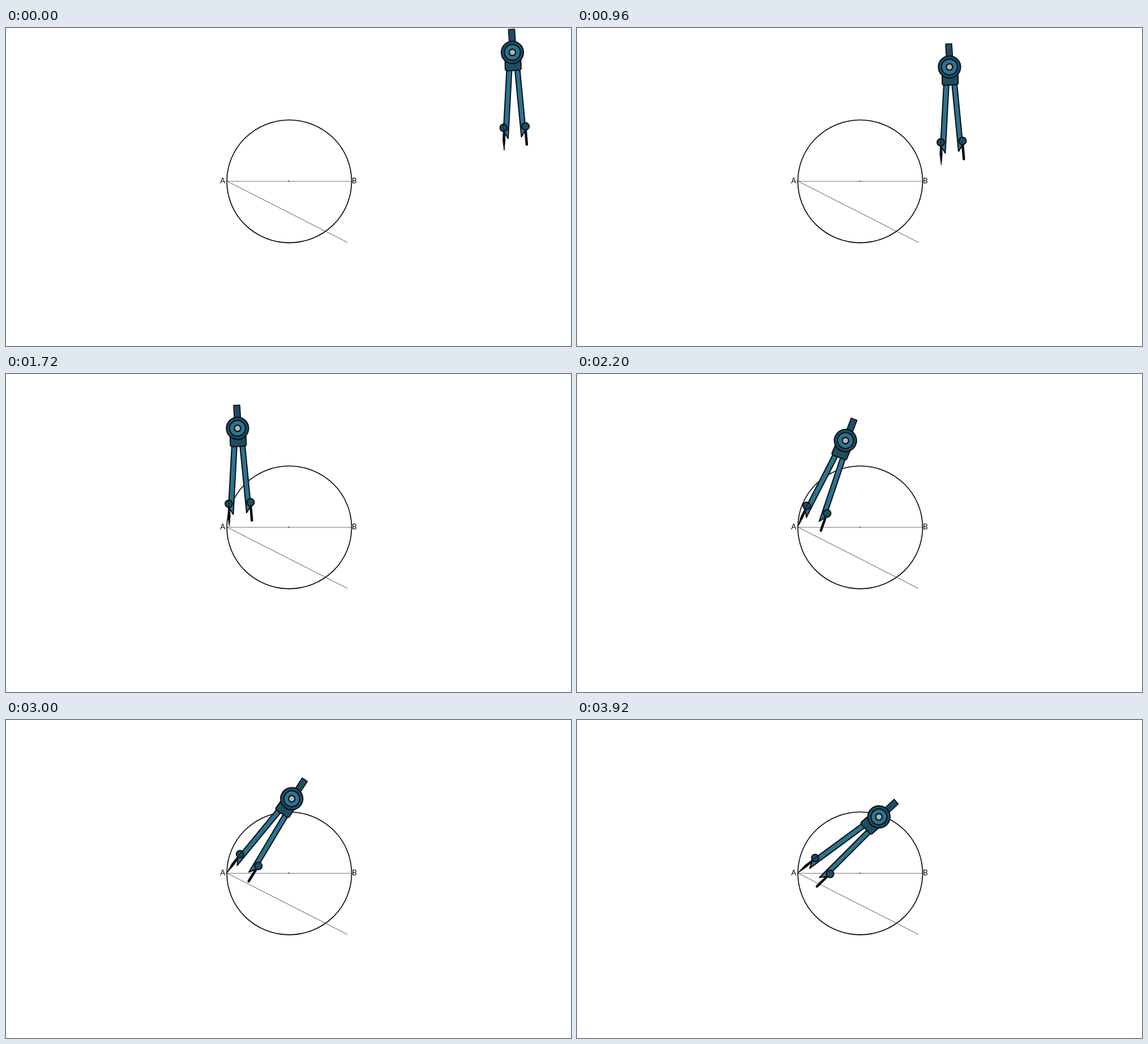
These frames come from a looping animation (998x561 px, 3.96 s). An HTML page with a canvas:

```html
<!DOCTYPE html>
<html lang="en">
<head>
<meta charset="utf-8">
<title>Compass construction</title>
<style>
html, body { margin: 0; width: 100%; height: 100%; overflow: hidden; background: #fff; }
canvas { display: block; }
</style>
</head>
<body>
<canvas id="stage" width="998" height="561"></canvas>
<script>
const ctx = document.getElementById('stage').getContext('2d');
const LOOP = 3960, STEP = 40;
const DARK = '#1e4c62', BLUE = '#2a7392', INK = '#0a0d0f';
const NEEDLE = { x: -14.5, y: 173.5 };   // needle point, relative to the hub
const START = { x: 880, y: 216.5 };      // needle point when the loop begins
const A = { x: 390, y: 269.8 };
const RAD = Math.PI / 180;
const clamp = v => Math.min(1, Math.max(0, v));

function finish(fill, stroke, width) {
  if (fill) { ctx.fillStyle = fill; ctx.fill(); }
  if (stroke) { ctx.strokeStyle = stroke; ctx.lineWidth = width; ctx.stroke(); }
}

function poly(points, fill, width = 2) {
  ctx.beginPath();
  points.forEach(([x, y]) => ctx.lineTo(x, y));
  ctx.closePath();
  finish(fill, INK, width);
}

function disc(x, y, r, fill, width = 2) {
  ctx.beginPath();
  ctx.arc(x, y, r, 0, 7);
  finish(fill, INK, width);
}

function line(x1, y1, x2, y2, color, width) {
  ctx.beginPath();
  ctx.moveTo(x1, y1);
  ctx.lineTo(x2, y2);
  finish(null, color, width);
}

function drawFigure() {
  ctx.lineCap = 'butt';
  line(390, 270.4, 610, 270.4, '#555', 0.8);
  line(390, 270, 603.5, 378.5, '#333', 0.8);
  ctx.beginPath();
  ctx.ellipse(500.3, 270.6, 110.2, 108.3, 0, 0, 7);
  finish(null, '#000', 1.6);
  ctx.beginPath();
  ctx.arc(499.5, 270.2, 0.9, 0, 7);
  finish('#000');
  ctx.fillStyle = '#000';
  ctx.font = '13.3px Lato, sans-serif';
  ctx.fillText('A', 378.3, 273.8);
  ctx.fillText('B', 610.9, 273.8);
}

function drawCompass(x, y, angle) {
  ctx.save();
  ctx.translate(x, y);
  ctx.rotate(angle);
  ctx.translate(-NEEDLE.x, -NEEDLE.y);
  ctx.lineJoin = 'round';

  poly([[-16.2, 139], [-17, 155], [-14.5, 173], [-12.8, 155], [-13.5, 139]], INK, 1);
  ctx.lineCap = 'round';
  line(23.3, 138, 25.4, 162.5, INK, 4.5);

  poly([[-10, 30], [-1, 30], [-7.5, 152], [-15.8, 139]], BLUE);
  poly([[4.3, 30], [13, 29], [23.5, 137], [16, 149]], BLUE);
  disc(-15.5, 133, 6.4, DARK);
  line(-15.3, 127.5, -15.7, 138.5, INK, 1);
  disc(23, 130.5, 6.6, DARK);

  poly([[-13, 13], [-12.7, 30], [-10.8, 32.4], [13.5, 31.2], [15.4, 29], [14.8, 12]], DARK);
  poly([[-7, -40.4], [4, -41], [5.5, -18], [-5.6, -17.5]], DARK, 1.6);
  disc(0, 0, 19.6, DARK);
  disc(0, 0, 14, BLUE);
  disc(0, 0, 5.6, '#b9b3b1', 2.2);
  ctx.restore();
}

const easeInOut = u => u < 0.5 ? 2 * u * u : 1 - 2 * (1 - u) ** 2;

// Quick turn into position, then a slow steady sweep.
function spin(t) {
  const sweepAt = 2120, sweep = 22.9;
  if (t < sweepAt) return sweep * clamp((t - 1880) / (sweepAt - 1880));
  return sweep + 0.0154 * (t - sweepAt);
}

function draw(t) {
  ctx.fillStyle = '#fff';
  ctx.fillRect(0, 0, 998, 561);
  drawFigure();

  const p = easeInOut(clamp((t - 114) / 1722));
  const turn = spin(t);
  const arcStart = 15, pencil = turn - 15;
  if (pencil > arcStart) {
    ctx.beginPath();
    ctx.arc(A.x, A.y, 41.5, arcStart * RAD, pencil * RAD);
    finish(null, '#777', 0.7);
  }
  drawCompass(START.x + (A.x - START.x) * p, START.y + (A.y - START.y) * p, turn * RAD);
}

function tick() {
  const t = performance.now() % LOOP;
  draw(Math.floor(t / STEP) * STEP);
  requestAnimationFrame(tick);
}
tick();
</script>
</body>
</html>
```
